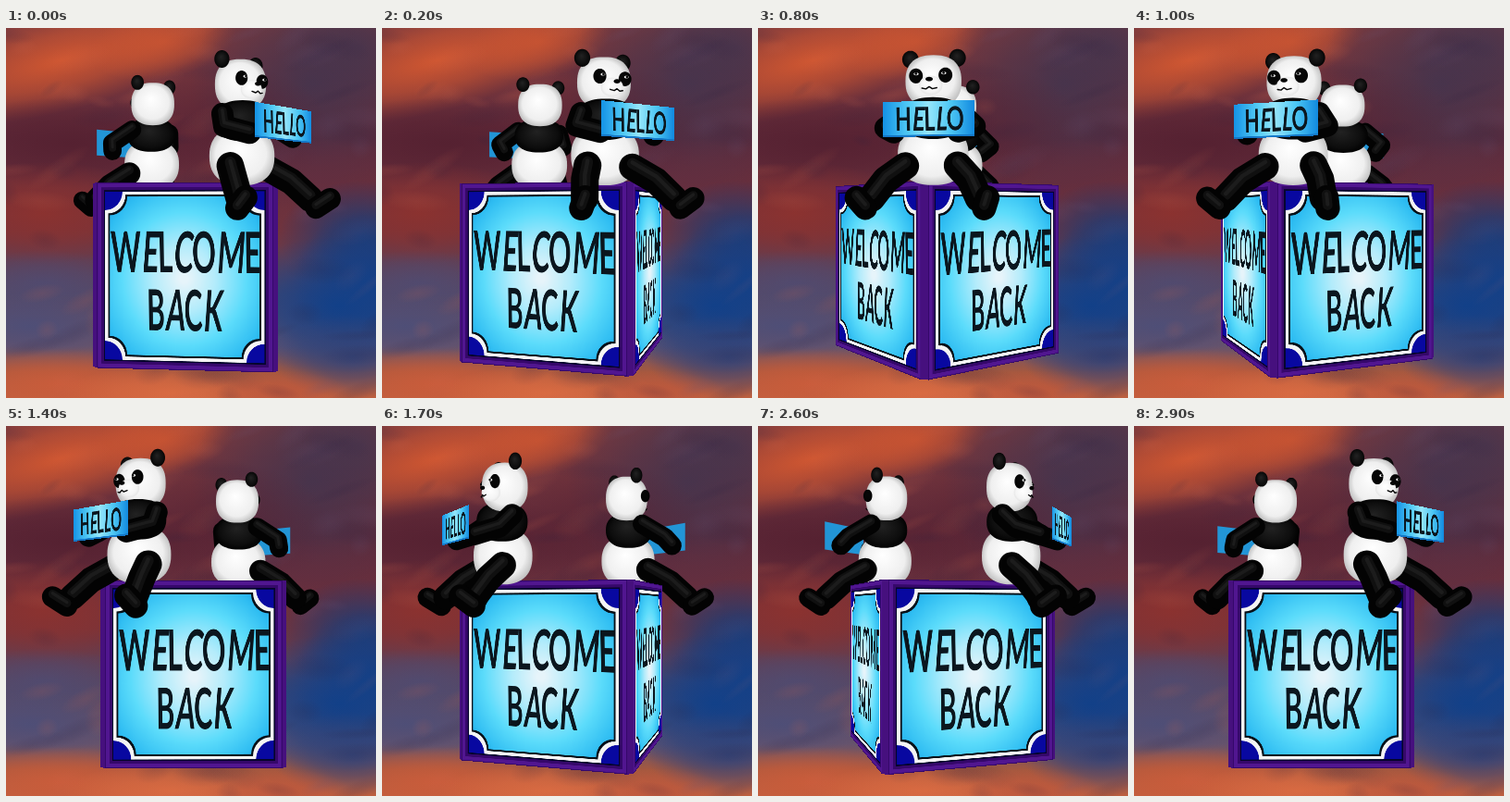
These frames come from a looping animation (400 by 400 pixels, 3 s). An HTML page with a canvas:

```html
<!DOCTYPE html>
<html lang="en">
<head>
<meta charset="utf-8">
<title>Welcome back</title>
<style>
html, body { margin: 0; width: 100%; height: 100%; overflow: hidden; background: #643040; }
canvas { display: block; width: 400px; height: 400px; }
</style>
</head>
<body>
<canvas id="stage" width="400" height="400"></canvas>
<script>
const ctx = document.getElementById('stage').getContext('2d');
const CX = 202, HORIZON = 193.5, CAMERA = 660;
const BOX = 88, BEVEL = 5, BOX_TOP = 23, BOX_BOTTOM = -153;
const STEP_MS = 100, LOOP_MS = 3000;
const rad = deg => deg * Math.PI / 180;

function layer(w, h, paint) {
  const c = document.createElement('canvas');
  c.width = w;
  c.height = h;
  paint(c.getContext('2d'), w, h);
  return c;
}

function addStops(gradient, stops) {
  stops.forEach(([at, color]) => gradient.addColorStop(at, color));
  return gradient;
}

// Each letter leans a little, alternating left and right
function letters(g, text, x, y, size, narrow) {
  g.save();
  g.translate(x, y);
  g.scale(narrow, 1);
  g.font = `bold ${size}px Lato, "Noto Sans", sans-serif`;
  g.fillStyle = '#0b161e';
  let pen = -g.measureText(text).width / 2;
  [...text].forEach((letter, i) => {
    g.save();
    g.translate(pen, 0);
    g.transform(1, 0, i % 2 ? -0.14 : 0.03, 1, 0, 0);
    g.fillText(letter, 0, 0);
    g.restore();
    pen += g.measureText(letter).width;
  });
  g.restore();
}

// Sky

function cloud(g, x, y, rx, ry, rgb, alpha, tilt = 0) {
  g.save();
  g.translate(x, y);
  g.rotate(tilt);
  g.scale(rx, ry);
  g.fillStyle = addStops(g.createRadialGradient(0, 0, 0, 0, 0, 1), [
    [0, `rgba(${rgb},${alpha})`], [0.5, `rgba(${rgb},${alpha * 0.6})`], [1, `rgba(${rgb},0)`]
  ]);
  g.fillRect(-1, -1, 2, 2);
  g.restore();
}

const sky = layer(400, 400, (g, w, h) => {
  g.fillStyle = addStops(g.createLinearGradient(0, 0, 0, h), [
    [0, '#7c3a3e'], [0.3, '#602a3a'], [0.55, '#70343e'], [0.72, '#574864'], [0.86, '#66536c'], [0.93, '#a5583f'], [1, '#bd6040']
  ]);
  g.fillRect(0, 0, w, h);
  const warm = '212,88,48', red = '142,50,46', maroon = '84,32,48', slate = '66,52,78', blue = '18,64,136', haze = '74,78,122';
  [
    [60, 35, 190, 55, warm, 0.95, -0.25], [170, 15, 80, 40, warm, 0.7, -0.2],
    [330, 60, 130, 120, slate, 0.85], [380, 20, 90, 70, slate, 0.7],
    [70, 125, 160, 50, maroon, 0.9], [240, 110, 110, 70, maroon, 0.5],
    [340, 160, 110, 40, '98,46,64', 0.6], [40, 200, 140, 55, red, 0.9],
    [40, 275, 100, 35, haze, 0.6], [25, 322, 100, 34, haze, 0.8],
    [385, 225, 90, 60, '34,58,112', 1], [360, 300, 130, 75, blue, 1], [400, 275, 90, 80, blue, 0.9],
    [375, 355, 90, 45, '48,66,120', 0.9],
    [60, 385, 140, 38, '204,92,58', 0.9], [180, 395, 120, 30, '220,108,66', 0.9],
    [295, 396, 80, 26, '190,86,60', 0.8]
  ].forEach(spot => cloud(g, ...spot));
  let seed = 11;
  const random = () => (seed = seed * 16807 % 2147483647) / 2147483647;
  for (let i = 0; i < 90; i++) {
    const x = random() * w, y = random() * h;
    const tone = random() < 0.5 ? '40,30,60' : x > 250 ? '105,85,120' : '205,100,75';
    cloud(g, x, y, 12 + random() * 35, 6 + random() * 10, tone, 0.14, random() - 0.7);
  }
});

// Box face and hand-held sign

function panelPath(g, lo, hi, r) {
  g.beginPath();
  [[lo, lo, 90], [hi, lo, 180], [hi, hi, 270], [lo, hi, 0]]
    .forEach(([x, y, start]) => g.arc(x, y, r, rad(start), rad(start - 90), true));
  g.closePath();
}

const faceArt = layer(400, 400, g => {
  g.fillStyle = '#35086a';
  g.fillRect(0, 0, 400, 400);
  g.strokeStyle = '#511690';
  g.lineWidth = 8;
  g.strokeRect(6, 6, 388, 388);
  g.fillStyle = '#05052c';
  g.fillRect(16, 16, 368, 368);
  g.fillStyle = '#0808a0';
  g.fillRect(19, 19, 362, 362);
  panelPath(g, 19, 381, 40);
  g.fillStyle = '#f4f4f4';
  g.fill();
  panelPath(g, 26, 374, 40);
  g.fillStyle = '#071018';
  g.fill();
  panelPath(g, 30, 370, 40);
  g.fillStyle = addStops(g.createRadialGradient(200, 205, 10, 200, 205, 250), [
    [0, '#e6f4fa'], [0.25, '#b4ecfb'], [0.55, '#5cdcfb'], [0.8, '#2fbdf2'], [1, '#1598e0']
  ]);
  g.fill();
  letters(g, 'WELCOME', 202, 192, 121, 0.55);
  letters(g, 'BACK', 200, 316, 121, 0.52);
});

const edgeArt = layer(8, 8, (g, w, h) => {
  g.fillStyle = '#46107e';
  g.fillRect(0, 0, w, h);
});

const signArt = layer(200, 76, (g, w, h) => {
  g.fillStyle = addStops(g.createLinearGradient(0, 0, w, 0), [
    [0, '#1593e6'], [0.3, '#55cdf6'], [0.5, '#96e6fa'], [0.75, '#4cc6f4'], [1, '#128ae0']
  ]);
  g.fillRect(0, 0, w, h);
  g.fillStyle = '#1478c8';
  g.fillRect(0, h - 4, w, 4);
  letters(g, 'HELLO', 102, 63, 70, 0.68);
});

// Projection: "turn" is the heading, 0 toward the viewer, growing to the right

function project(turn, out, side, up) {
  const s = Math.sin(turn), c = Math.cos(turn);
  const z = out * c - side * s, scale = CAMERA / (CAMERA - z);
  return { x: CX + (out * s + side * c) * scale, y: HORIZON - up * scale, z, scale };
}

const facesViewer = (turn, out) => Math.cos(turn) * CAMERA > out;

// Upright picture in perspective, drawn column by column
function upright(art, turn, out, half, top, bottom) {
  const s = Math.sin(turn), c = Math.cos(turn);
  const left = project(turn, out, -half, 0).x, right = project(turn, out, half, 0).x;
  for (let x = Math.round(left); x < Math.round(right); x++) {
    const k = (x + 0.5 - CX) / CAMERA;
    const side = (k * (CAMERA - out * c) - out * s) / (c - k * s);
    const scale = CAMERA / (CAMERA - out * c + side * s);
    const stepU = Math.min(art.width, Math.max(1, art.width / (right - left)));
    const u = (side / half + 1) / 2 * art.width - stepU / 2;
    ctx.drawImage(art, Math.max(0, Math.min(art.width - stepU, u)), 0, stepU, art.height,
      x, HORIZON - top * scale, 1, (top - bottom) * scale);
  }
}

function drawBox(spin) {
  const wall = (art, turn, out, half) => {
    if (facesViewer(turn, out)) upright(art, turn, out, half, BOX_TOP, BOX_BOTTOM);
  };
  for (let k = 0; k < 4; k++) {
    const turn = rad(90 * k) - spin;
    wall(faceArt, turn, BOX, BOX - BEVEL);
    wall(edgeArt, turn + rad(45), (2 * BOX - BEVEL) * Math.SQRT1_2, BEVEL * Math.SQRT1_2);
  }
}

// Pandas

const SHADES = {
  white: ['#ffffff', '#efefef', '#bcbcbc'],
  snout: ['#ffffff', '#f4f4f4', '#e2e2e2'],
  black: ['#222222', '#0d0d0d', '#000000'],
  ink: ['#080808', '#050505', '#000000']
};

// Rounded solid; "square" below 1 fills out its corners
function blob(turn, out, side, up, wide, tall, deep, shade, lift = 0, square = 1) {
  const p = project(turn, out, side, up);
  const bulge = v => Math.sign(v) * Math.abs(v) ** square;
  return {
    z: p.z + lift,
    draw() {
      ctx.save();
      ctx.translate(p.x, p.y);
      ctx.scale(Math.hypot(wide * Math.cos(turn), deep * Math.sin(turn)) * p.scale, tall * p.scale);
      const fill = ctx.createRadialGradient(-0.1, -0.25, 0, 0, 0, 1.08);
      SHADES[shade].forEach((color, i) => fill.addColorStop([0, 0.72, 1][i], color));
      ctx.fillStyle = fill;
      ctx.beginPath();
      for (let a = 0; a < 360; a += 6) ctx.lineTo(bulge(Math.cos(rad(a))), bulge(Math.sin(rad(a))));
      ctx.fill();
      ctx.restore();
    }
  };
}

function limb(turn, points, radius, lift = 0) {
  const path = points.map(point => project(turn, ...point));
  const scale = path[0].scale;
  const stroke = (width, color, dy) => {
    ctx.beginPath();
    path.forEach(p => ctx.lineTo(p.x, p.y + dy));
    ctx.lineWidth = width;
    ctx.strokeStyle = color;
    ctx.lineCap = ctx.lineJoin = 'round';
    ctx.stroke();
  };
  return {
    z: path.reduce((sum, p) => sum + p.z, 0) / path.length + lift,
    draw() {
      stroke(radius * 2 * scale, '#030303', 0);
      if (radius > 3) {
        stroke(radius * 0.8 * scale, '#101010', -radius * 0.3);
        stroke(radius * 0.3 * scale, '#1c1c1c', -radius * 0.38);
      }
    }
  };
}

function sign(turn) {
  const out = 128, half = 40, top = 92.5, bottom = 61.5, front = facesViewer(turn, out);
  return {
    z: project(turn, out, 0, 0).z + (front ? 60 : -60),
    draw() {
      if (front) return upright(signArt, turn, out, half, top, bottom);
      ctx.fillStyle = '#2295d6';
      ctx.beginPath();
      [[-half, top], [half, top], [half, bottom], [-half, bottom]].forEach(([side, up]) => {
        const p = project(turn, out, side, up);
        ctx.lineTo(p.x, p.y);
      });
      ctx.fill();
    }
  };
}

function drawPanda(turn) {
  const parts = [
    blob(turn, 76, 0, 50, 34, 29, 29, 'white', 0, 0.85),
    blob(turn, 77, 0, 85, 30, 20, 25, 'black', 2, 0.85),
    blob(turn, 74, 0, 121, 27, 25, 22.5, 'white', 4, 0.82),
    blob(turn, 89, 0, 114, 11, 9, 9, 'snout', 4),
    blob(turn, 98, 0, 118, 3.4, 2, 2, 'ink', 5),
    limb(turn, [[97, -7, 110], [98, -3, 109], [98, 0, 111], [98, 3, 109], [97, 7, 110]], 0.6, 6),
    sign(turn + rad(2))
  ];
  for (const m of [-1, 1]) {
    parts.push(
      blob(turn, 72, 23 * m, 143, 8, 8.5, 6, 'black'),
      blob(turn, 90, 14 * m, 123, 6.5, 7, 4.5, 'ink', 3),
      blob(turn, 94, 13 * m, 124, 2.4, 1.3, 1.2, 'white', 4),
      blob(turn, 95, 13 * m, 124, 1.2, 1.2, 1, 'ink', 5),
      limb(turn, [[77, 27 * m, 89], [96, 42 * m, 74], [116, 29 * m, 67]], 10.5),
      limb(turn, [[86, 25 * m, 39], [106, 39 * m, 25], [122, 48 * m, 8]], 13),
      limb(turn, [[125, 53 * m, -1], [139, 57 * m, 8]], 10.5, 3)
    );
  }
  parts.sort((a, b) => a.z - b.z).forEach(part => part.draw());
}

function render() {
  const step = Math.floor(performance.now() % LOOP_MS / STEP_MS);
  const spin = rad(5.5 + step * 180 * STEP_MS / LOOP_MS);
  const turns = [rad(45) - spin, rad(225) - spin].sort((a, b) => Math.cos(a) - Math.cos(b));
  const behind = turn => Math.cos(turn) < -0.2;
  ctx.drawImage(sky, 0, 0);
  turns.filter(behind).forEach(drawPanda);
  drawBox(spin);
  turns.filter(turn => !behind(turn)).forEach(drawPanda);
  requestAnimationFrame(render);
}
render();
</script>
</body>
</html>
```
